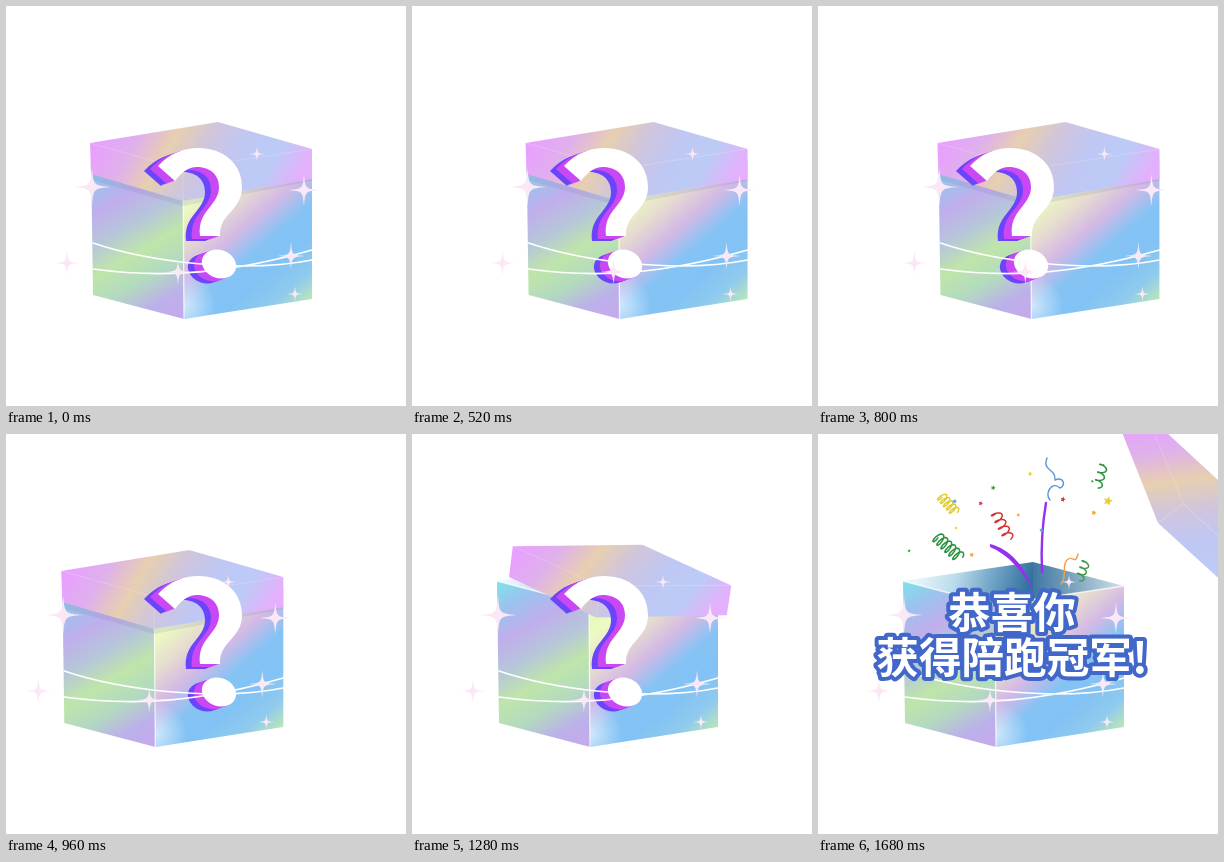
An HTML page with a canvas that plays this animation: 400x400 px, repeating every 2.46 s.

```html
<!DOCTYPE html>
<html lang="zh">
<head>
<meta charset="utf-8">
<title>Gift box</title>
<style>
  html, body { margin: 0; width: 100%; height: 100%; overflow: hidden; background: #fff; }
  canvas { display: block; width: 400px; height: 400px; }
</style>
</head>
<body>
<canvas id="stage" width="400" height="400"></canvas>
<script>
const ctx = document.getElementById('stage').getContext('2d');
const LOOP = 2460, STEP = 40, RAD = Math.PI / 180;

const lerp = (a, b, k) => a + (b - a) * k;
const span = (t, a, b) => Math.max(0, Math.min(1, (t - a) / (b - a)));
const easeOut = k => 1 - (1 - k) ** 2;

// Evenly spaced colour stops
function gradient(x0, y0, x1, y1, colors) {
  const g = ctx.createLinearGradient(x0, y0, x1, y1);
  colors.split(' ').forEach((c, i, all) => g.addColorStop(i / (all.length - 1), c));
  return g;
}

function fill(d, style) {
  ctx.fillStyle = style;
  ctx.fill(new Path2D(d));
}

function line(d, color, width) {
  ctx.strokeStyle = color;
  ctx.lineWidth = width;
  ctx.stroke(new Path2D(d));
}

// Draws with the pivot moved, turned and scaled
function around(x, y, { dx = 0, dy = 0, turn = 0, size = 1 }, paint) {
  ctx.save();
  ctx.translate(x + dx, y + dy);
  ctx.rotate(turn * RAD);
  ctx.scale(size, size);
  ctx.translate(-x, -y);
  paint();
  ctx.restore();
}

// Side-to-side swing that loses a fifth of its width each way, then settles
function shake(t) {
  const i = Math.floor((t - 480) / 160), peak = n => 54 * (-.81) ** n;
  if (i < 0) return 54 * span(t, 320, 480);
  if (i < 3) return lerp(peak(i), peak(i + 1), (t - 480) / 160 - i);
  return lerp(peak(3), 5, span(t, 960, 1120)) - 5 * span(t, 1120, 1200);
}

function drawInside() {
  fill('M85 147L215 128L215 166L177 171Z',
    gradient(100, 140, 205, 172, '#e8f5fc #bcdcec #70a4c6 #34709f'));
  fill('M215 128L306 152L215 166Z', gradient(215, 150, 300, 146, '#3f78a4 #80a6c0 #c9dbe6'));
}

function drawBody(closed) {
  const right = 'M177 171L306 152V293L178 313Z';
  fill('M85 147L177 171L178 313L87 289Z', gradient(85, 147, 180, 313,
    '#7fe3ea #9cc2ee #c0aeec #b6c6da #bfe5aa #b3dabf #bcb0ea #c6a9ec'));
  fill(right, gradient(177, 171, 294, 308,
    '#e4f8b6 #ebfac2 #e6dccf #d4b9e5 #86c3f5 #82c2f4 #8fcaee #c2ecae'));
  const glow = ctx.createRadialGradient(178, 300, 0, 178, 300, 32);
  glow.addColorStop(0, 'rgba(255,255,255,.6)');
  glow.addColorStop(1, 'rgba(255,255,255,0)');
  fill(right, glow);
  line('M85 147L177 171L306 152M177 171L178 313', 'rgba(255,255,255,.7)', 1.3);
  if (closed) fill('M86 168L177 195L306 173V175L177 200L86 174Z', 'rgba(120,120,165,.16)');
}

// The lid turns about its front corner while it flies up and to the right
function drawLid(t) {
  const k = span(t, 1200, 1680);
  around(177, 195, { dx: 163 * k ** 1.76, dy: -106 * k ** 1.24, turn: 52 * k }, () => {
    fill('M84 137L85 168L177 195L306 173V143L212 116Z', gradient(84, 150, 249, 247,
      '#e8a0fe #dfb0ec #e7cfb0 #cfc5de #bfc7f4 #bccbf6 #e4affb'));
    line('M84 137L177 163L306 143M177 163V195', 'rgba(255,255,255,.18)', 1);
  });
}

const mark = new Path2D('M152 160C164 147 178 142 192 142C218 142 236 158 236 181' +
  'C236 205 213 207 214 230L194 230C191 204 213 200 213 181C213 167 202 161 191 161' +
  'C182 161 175 167 169 175Z');
mark.ellipse(213, 258, 17.5, 14, .35, 0, 7);

function drawMark(t) {
  const size = 1 - span(t, 1280, 1400);
  const turn = t > 1120 ? 10 * Math.sin((t - 1120) / 80 * Math.PI) : 0;
  if (!size) return;
  around(200, 203, { turn, size }, () => {
    for (let d = 14; d >= 0; d -= 2) {
      ctx.fillStyle = d > 8 ? '#6a45fb' : d ? '#c948f4' : '#fff';
      around(0, 0, { dx: -d, dy: d * .36 }, () => ctx.fill(mark));
    }
  });
}

function sparkle(x, y, r) {
  const q = r * .08;
  ctx.beginPath();
  ctx.moveTo(x, y - r);
  for (let i = 0; i < 4; i++) {
    const c = Math.round(Math.cos(i * 90 * RAD)), s = Math.round(Math.sin(i * 90 * RAD));
    const cx = x + q * (c + s), cy = y + q * (s - c);
    ctx.bezierCurveTo(cx, cy, cx, cy, x + r * c, y + r * s);
  }
  ctx.fillStyle = '#fbe8f6';
  ctx.fill();
}

function drawTrim() {
  line('M87 237C140 255 235 268 306 254M87 263C160 273 225 267 306 244', '#fff', 1.6);
  sparkle(86, 181, 19);
  sparkle(61, 257, 13);
  sparkle(298, 184, 16);
  sparkle(285, 250, 14);
  sparkle(251, 148, 8);
  sparkle(172, 266, 13);
  sparkle(289, 288, 8);
}

function coil(x, y, length, turn, turns, r, color) {
  around(x, y, { turn }, () => {
    ctx.beginPath();
    for (let k = 0; k <= 1; k += .01) {
      const w = k * turns * 360 * RAD;
      ctx.lineTo(x + length * (k - .5) + r * .4 * Math.cos(w), y + r * Math.sin(w));
    }
    ctx.strokeStyle = color;
    ctx.lineWidth = 1.5;
    ctx.stroke();
  });
}

function star(x, y, r, color) {
  ctx.beginPath();
  for (let i = 0; i < 10; i++) {
    const a = i * 36 * RAD - 1.3, s = i % 2 ? r * .45 : r;
    ctx.lineTo(x + s * Math.cos(a), y + s * Math.sin(a));
  }
  ctx.fillStyle = color;
  ctx.fill();
}

function drawSpecks() {
  const colors = ['#35a83f', '#f0a62e', '#e5d230', '#5aa5dc', '#d8323e'];
  let seed = 7;
  const random = () => (seed = seed * 16807 % 2147483647) / 2147483647;
  random();
  for (let i = 0; i < 12; i++) {
    const a = (195 + i * 10.5) * RAD, r = 50 + 85 * random();
    star(215 + r * Math.cos(a), 150 + r * Math.sin(a), 1.5 + 1.5 * random(), colors[i % 5]);
  }
  star(290, 67, 5, colors[2]);
}

function drawConfetti(t) {
  const size = easeOut(span(t, 1440, 1680));
  if (!size) return;
  around(215, 152, { size }, () => {
    fill('M172 110C192 115 207 132 215 156C204 137 191 121 172 113Z', '#9430ee');
    line('M228 69C224 92 223 115 224 138', '#9430ee', 2.4);
    line('M229 24C224 38 238 34 237 46C246 42 248 52 242 54C234 46 226 60 232 66', '#5a94d4', 1.4);
    line('M243 150C250 142 243 132 249 126C255 120 257 132 260 120', '#f0a04a', 1.4);
    coil(130, 113, 32, 42, 6, 6, '#27913c');
    coil(130, 70, 22, 48, 5, 5, '#e0cc2c');
    coil(184, 91, 30, 62, 4, 5, '#d8322e');
    coil(283, 41, 24, 105, 3, 4, '#27913c');
    coil(265, 136, 20, 110, 3, 4, '#3f9a45');
    drawSpecks();
  });
}

function drawTitle(t) {
  const size = easeOut(span(t, 1480, 1680));
  if (!size) return;
  around(194, 205, { dy: 14 * (1 - size), size }, () => {
    ctx.font = '700 42.6px "Noto Sans CJK SC", "Noto Sans CJK", sans-serif';
    ctx.textAlign = 'center';
    ctx.strokeStyle = '#4167c9';
    ctx.lineWidth = 8;
    ctx.fillStyle = '#fff';
    for (const paint of ['strokeText', 'fillText']) {
      ctx[paint]('恭喜你', 194, 194);
      ctx[paint]('获得陪跑冠军!', 194, 238.5);
    }
  });
}

function draw(now) {
  const t = Math.floor(now % LOOP / STEP) * STEP, swing = { dx: shake(t) };
  ctx.fillStyle = '#fff';
  ctx.fillRect(0, 0, 400, 400);
  ctx.lineJoin = ctx.lineCap = 'round';
  around(0, 0, swing, () => {
    drawInside();
    drawBody(t <= 1200);
    drawLid(t);
  });
  drawMark(t);
  drawConfetti(t);
  around(0, 0, swing, drawTrim);
  drawTitle(t);
}

const start = performance.now();
function tick() {
  draw(performance.now() - start);
  requestAnimationFrame(tick);
}
tick();
</script>
</body>
</html>
```
